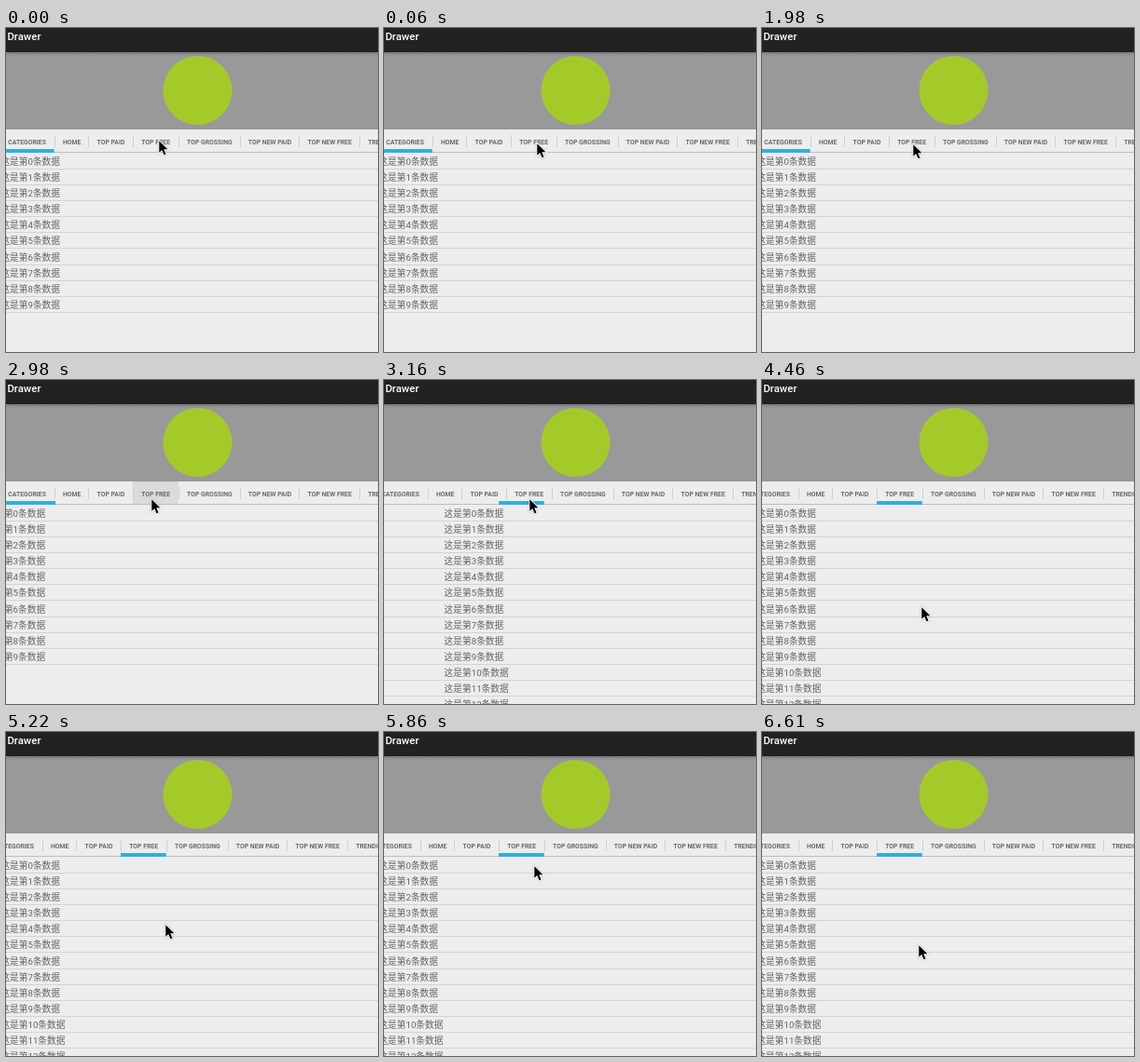
An HTML page with a canvas that plays this animation: 399 px wide and 348 px high, repeating every 8 s.

```html
<!DOCTYPE html>
<html lang="zh-CN">
<head>
<meta charset="utf-8">
<title>Drawer</title>
<style>
  html, body { margin: 0; width: 100%; height: 100%; overflow: hidden; background: #ededed; }
  canvas { display: block; width: 399px; height: 348px; }
</style>
</head>
<body>
<canvas id="stage"></canvas>
<script>
const WIDTH = 399, HEIGHT = 348, LOOP = 8000;
const canvas = document.getElementById('stage');
const ctx = canvas.getContext('2d');
const ratio = window.devicePixelRatio || 1;
canvas.width = WIDTH * ratio;
canvas.height = HEIGHT * ratio;

const PAGE_LEFT = -7, PAGE_WIDTH = 425, LIST_TOP = 134, ROW = 17.15;
const PAGE_ROWS = [10, 13, 13, 13];
const TAB_PADDING = 9.2, SCROLL_OFFSET = 123, TARGET = 3;
const TABS = [
  ['CATEGORIES', -7], ['HOME', 51.7], ['TOP PAID', 88.3], ['TOP FREE', 136],
  ['TOP GROSSING', 184.8], ['TOP NEW PAID', 250.6], ['TOP NEW FREE', 314.3], ['TRENDING', 379]
];

const SLIDE = { start: 2979, first: 2980, last: 3330, steps: 7, duration: 400 };

// Pointer moves: first change, last change, number of steps, points passed
const START = [163, 119];
const MOVES = [
  [60, 60, 1, [[163, 122]]],
  [1980, 2150, 4, [[155, 126]]],
  [3630, 3870, 5, [[180, 196]]],
  [4100, 4460, 7, [[185, 194], [170, 242]]],
  [5110, 5220, 3, [[170, 205]]],
  [5280, 5910, 12, [[159, 136]]],
  [5970, 6030, 2, [[156, 128]]],
  [6260, 6610, 7, [[167, 227]]]
];

const lerp = (a, b, p) => a + (b - a) * p;

function stepIndex(time, first, last, steps) {
  if (time >= last) return steps;
  if (time < first) return 0;
  return 1 + Math.floor((time - first) / (last - first) * (steps - 1) + 1e-6);
}

function pointerAt(time) {
  let from = START;
  for (const [first, last, steps, points] of MOVES) {
    if (time < first) break;
    const path = [from, ...points];
    const along = stepIndex(time, first, last, steps) / steps * points.length;
    const leg = Math.min(Math.floor(along), points.length - 1);
    from = path[leg].map((v, axis) => lerp(v, path[leg + 1][axis], along - leg));
  }
  return from.map(Math.round);
}

function pageAt(time) {
  const { start, first, last, steps, duration } = SLIDE;
  if (time < first) return 0;
  if (time >= last) return TARGET;
  const shown = first + (stepIndex(time, first, last, steps) - 1) * (last - first) / (steps - 1);
  return TARGET * (1 - (1 - (shown - start) / duration) ** 5);
}

function rect(x, y, w, h, color) {
  ctx.fillStyle = color;
  ctx.fillRect(x, y, w, h);
}

function label(text, x, y, font, color) {
  ctx.font = font;
  ctx.fillStyle = color;
  ctx.fillText(text, x, y);
}

function drawList(x, rows) {
  for (let i = 0; i < rows; i++) {
    const top = LIST_TOP + i * ROW;
    label(`这是第${i}条数据`, x + 1.4, top + 12.6,
      '9.7px Roboto, "Noto Sans CJK SC", "Noto Sans CJK", sans-serif', '#646464');
    rect(Math.round(x), Math.floor(top + ROW), PAGE_WIDTH, 1, '#d3d3d3');
  }
}

function drawHeader() {
  rect(0, 26, WIDTH, 83, '#999');
  const shadow = ctx.createLinearGradient(0, 26, 0, 30);
  shadow.addColorStop(0, '#7c7c7c');
  shadow.addColorStop(1, '#999');
  rect(0, 26, WIDTH, 4, shadow);
  ctx.fillStyle = '#a4ca2a';
  ctx.beginPath();
  ctx.arc(205.5, 67, 37, 0, Math.PI * 2);
  ctx.fill();
  rect(0, 0, WIDTH, 26, '#222');
  label('Drawer', 1.4, 13, '500 11.4px Roboto, sans-serif', '#fff');
}

function drawTabs(page, pressed) {
  const index = Math.floor(page), part = page - index;
  const edge = i => lerp(TABS[i][1], TABS[i + 1][1], part);
  const left = edge(index), right = edge(index + 1);
  const scroll = Math.round(Math.max(0, left - SCROLL_OFFSET));

  rect(0, 109, WIDTH, 25, '#ededed');
  ctx.save();
  ctx.translate(-scroll, 0);
  if (pressed) {
    const x = TABS[TARGET][1];
    rect(x, 109, TABS[TARGET + 1][1] - x, 24, '#dbdbdb');
  }
  rect(-20, 133, 480, 1, '#bdbdbd');
  rect(left, 130, right - left, 4, '#2eb0e0');
  TABS.forEach(([text, x], i) => {
    label(text, x + TAB_PADDING, 125.2, 'bold 6.86px Roboto, sans-serif', '#6a6a6a');
    if (i) rect(Math.round(x), 115, 1, 13, '#d0d0d0');
  });
  ctx.restore();
}

const ARROW = new Path2D('M1.3 2.2V14.8L4.2 12 6.5 17.3 8.5 16.4 6.3 11.2H10.4Z');

function drawPointer([x, y]) {
  ctx.save();
  ctx.translate(x, y);
  ctx.shadowColor = 'rgba(0, 0, 0, .35)';
  ctx.shadowBlur = 1.5 * ratio;
  ctx.strokeStyle = '#fff';
  ctx.lineWidth = 1.8;
  ctx.stroke(ARROW);
  ctx.shadowColor = 'transparent';
  ctx.fillStyle = '#000';
  ctx.fill(ARROW);
  ctx.restore();
}

function draw(time) {
  const page = pageAt(time);
  ctx.setTransform(ratio, 0, 0, ratio, 0, 0);
  rect(0, 0, WIDTH, HEIGHT, '#ededed');
  PAGE_ROWS.forEach((rows, i) => drawList(PAGE_LEFT + (i - page) * PAGE_WIDTH, rows));
  drawHeader();
  drawTabs(page, time >= 2980 && time < 3038);
  drawPointer(pointerAt(time));
}

const begin = performance.now();
function tick() {
  draw((performance.now() - begin) % LOOP);
  requestAnimationFrame(tick);
}
tick();
</script>
</body>
</html>
```
